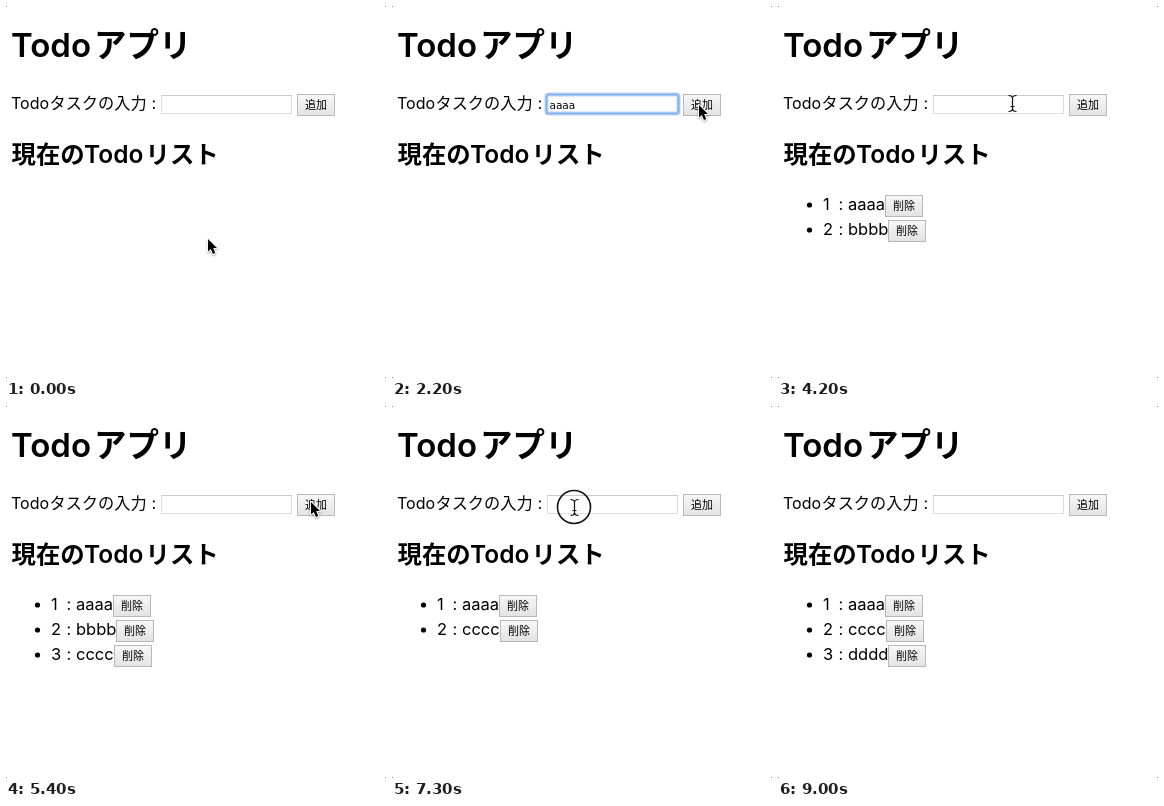
Animation, 380 px wide and 372 px high, one loop 9100 ms. Source, as an HTML page with a canvas:

```html
<!DOCTYPE html>
<html lang="ja">
<head>
<meta charset="utf-8">
<title>Todoアプリ</title>
<style>
  html, body { margin: 0; width: 100%; height: 100%; overflow: hidden; background: #fff; }
  canvas { display: block; width: 380px; height: 372px; }
</style>
</head>
<body>
<canvas id="stage" width="380" height="372"></canvas>
<script>
const ctx = document.getElementById('stage').getContext('2d');
const LOOP = 9100, STEP = 100;
const JP = '"Noto Sans CJK JP", "Noto Sans CJK", sans-serif';
const LATIN = 'Inter, sans-serif';
const FIELD = '"DejaVu Sans", sans-serif';

// Times are in steps: click the field, type, leave it, submit
const entries = [
  { ch: 'a', click: 10, type: 13, leave: 17, submit: 24, field: [250, 101], add: [307, 99] },
  { ch: 'b', click: 29, type: 32, leave: 35, submit: 40, field: [255, 105], add: [317, 102] },
  { ch: 'c', click: 43, type: 45, leave: 50, submit: 54, field: [234, 97], add: [305, 96] },
  { ch: 'd', click: 73, type: 75, leave: 80, submit: 86, field: [182, 101], add: [316, 101] }
];
const removal = { ch: 'b', move: 55, click: 63, at: [135, 221] };
const exit = { move: 87, end: 90, at: [150, 385] };

const clicks = [removal.click, ...entries.flatMap(e => [e.click, e.submit - 1])];
const glides = buildGlides();

function buildGlides() {
  const list = [];
  const glide = (from, to, at) => list.push({ from, to, at });
  glide(0, 3, [18, 28]);
  entries.forEach((e, i) => {
    const last = entries[i - 1];
    if (!last) glide(3, 6, e.field);
    else if (last.submit < removal.move && removal.move < e.click) {
      glide(removal.move, removal.click - 1, removal.at);
      glide(removal.click + 3, e.click - 1, e.field);
    } else glide(last.submit, e.click - 1, e.field);
    glide(e.leave, e.submit - 2, e.add);
  });
  glide(exit.move, exit.end, exit.at);
  return list;
}

function pointerAt(step) {
  let x = 202, y = 233;
  for (const { from, to, at } of glides) {
    const k = Math.max(0, Math.min(1, (step - from) / (to - from)));
    const ease = k * k * (3 - 2 * k);
    x += (at[0] - x) * ease;
    y += (at[1] - y) * ease;
  }
  return { x, y };
}

function text(str, x, y, size, family = JP, weight = 400) {
  ctx.font = `${weight} ${size}px ${family}`;
  ctx.fillStyle = '#000';
  ctx.fillText(str, x, y);
}

function button(label, x, y) {
  const g = ctx.createLinearGradient(0, y, 0, y + 22);
  g.addColorStop(0, '#f8f8f8');
  g.addColorStop(1, '#e2e2e2');
  ctx.fillStyle = g;
  ctx.fillRect(x, y, 38, 22);
  ctx.lineWidth = 1;
  ctx.strokeStyle = '#b8b8b8';
  ctx.strokeRect(x + .5, y + .5, 37, 21);
  text(label, x + 8, y + 15, 11);
}

function focusRing() {
  ctx.beginPath();
  ctx.roundRect(154.5, 88.5, 132, 19, 2);
  for (const [width, color] of [[5, '#dce9fb'], [3, '#a9c8f3'], [1.2, '#83aeea']]) {
    ctx.lineWidth = width;
    ctx.strokeStyle = color;
    ctx.stroke();
  }
}

function input(step) {
  const e = entries.find(e => step > e.click && step < e.submit);
  if (!e) {
    ctx.lineWidth = 1;
    ctx.strokeStyle = '#dedede';
    ctx.strokeRect(155.5, 89.5, 130, 18);
    ctx.fillStyle = '#cacaca';
    ctx.fillRect(155, 89, 131, 1);
    return;
  }
  focusRing();
  const typed = Math.max(0, Math.min(4, step - e.type + 1));
  const value = e.ch.repeat(typed);
  text(value, 157.5, 103, 10.5, FIELD);
  if (step < e.type + 7) ctx.fillRect(Math.round(158 + ctx.measureText(value).width), 93, 1, 12);
}

function list(step) {
  entries
    .filter(e => step >= e.submit && !(e.ch === removal.ch && step > removal.click))
    .forEach((e, i) => {
      const y = 189 + 25 * i, value = e.ch.repeat(4);
      ctx.fillStyle = '#000';
      ctx.beginPath();
      ctx.arc(31.5, y + 10, 2.6, 0, 7);
      ctx.fill();
      text(i + 1, 45, y + 15, 16.5, LATIN);
      text(':', 60.5, y + 15, 16.5, LATIN);
      text(value, 70, y + 15, 16.5, LATIN);
      button('削除', Math.round(70 + ctx.measureText(value).width), y);
    });
}

function arrow(x, y) {
  ctx.save();
  ctx.translate(x, y);
  ctx.beginPath();
  [[0, 0], [0, 12.5], [2.8, 9.9], [5, 15], [7.2, 14], [5.2, 9], [9, 9]]
    .forEach(p => ctx.lineTo(...p));
  ctx.closePath();
  ctx.shadowColor = 'rgba(0,0,0,.35)';
  ctx.shadowBlur = 2;
  ctx.shadowOffsetY = 1;
  ctx.strokeStyle = '#fff';
  ctx.lineWidth = 2;
  ctx.lineJoin = 'round';
  ctx.stroke();
  ctx.shadowColor = 'transparent';
  ctx.fillStyle = '#000';
  ctx.fill();
  ctx.restore();
}

function beam(x, y) {
  ctx.save();
  ctx.translate(Math.round(x) + .5, Math.round(y) + .5);
  ctx.beginPath();
  for (const s of [-1, 1]) {
    ctx.moveTo(-4, 8 * s);
    ctx.quadraticCurveTo(0, 8 * s, 0, 5 * s);
    ctx.quadraticCurveTo(0, 8 * s, 4, 8 * s);
  }
  ctx.moveTo(0, -6);
  ctx.lineTo(0, 6);
  ctx.moveTo(-2, 3);
  ctx.lineTo(2, 3);
  ctx.strokeStyle = '#111';
  ctx.lineWidth = 1.2;
  ctx.stroke();
  ctx.restore();
}

function pointer(step) {
  // The pointer hides while keys are pressed
  if (entries.some(e => step >= e.type && step < e.leave)) return;
  const { x, y } = pointerAt(step);
  const inField = x > 155 && x < 286 && y > 88 && y < 108;
  (inField ? beam : arrow)(x, y);
  if (!clicks.includes(step)) return;
  ctx.beginPath();
  ctx.arc(x + (inField ? 0 : 5), y - (inField ? 0 : 3), 16.5, 0, 7);
  ctx.strokeStyle = '#111';
  ctx.lineWidth = 1.6;
  ctx.stroke();
}

function corners() {
  ctx.fillStyle = '#888';
  for (const x of [0, 379]) for (const y of [0, 371]) ctx.fillRect(x, y, 1, 1);
}

function headings() {
  text('Todo', 5, 51, 33, LATIN, 600);
  text('アプリ', 88, 51, 32.5, JP, 700);
  text('Todo', 5, 103, 16, LATIN);
  text('タスクの入力', 43.5, 103, 16.2);
  text(':', 145.5, 103, 16.5, LATIN);
  text('現在の', 5.5, 157, 24.4, JP, 700);
  text('Todo', 78, 157, 24.5, LATIN, 600);
  text('リスト', 139.5, 157, 24.4, JP, 700);
}

function draw(step) {
  ctx.fillStyle = '#fff';
  ctx.fillRect(0, 0, 380, 372);
  headings();
  button('追加', 291, 88);
  input(step);
  list(step);
  pointer(step);
  corners();
}

const start = performance.now();
function tick() {
  const t = (performance.now() - start) % LOOP;
  draw(Math.floor(t / STEP));
  requestAnimationFrame(tick);
}
tick();
</script>
</body>
</html>
```
